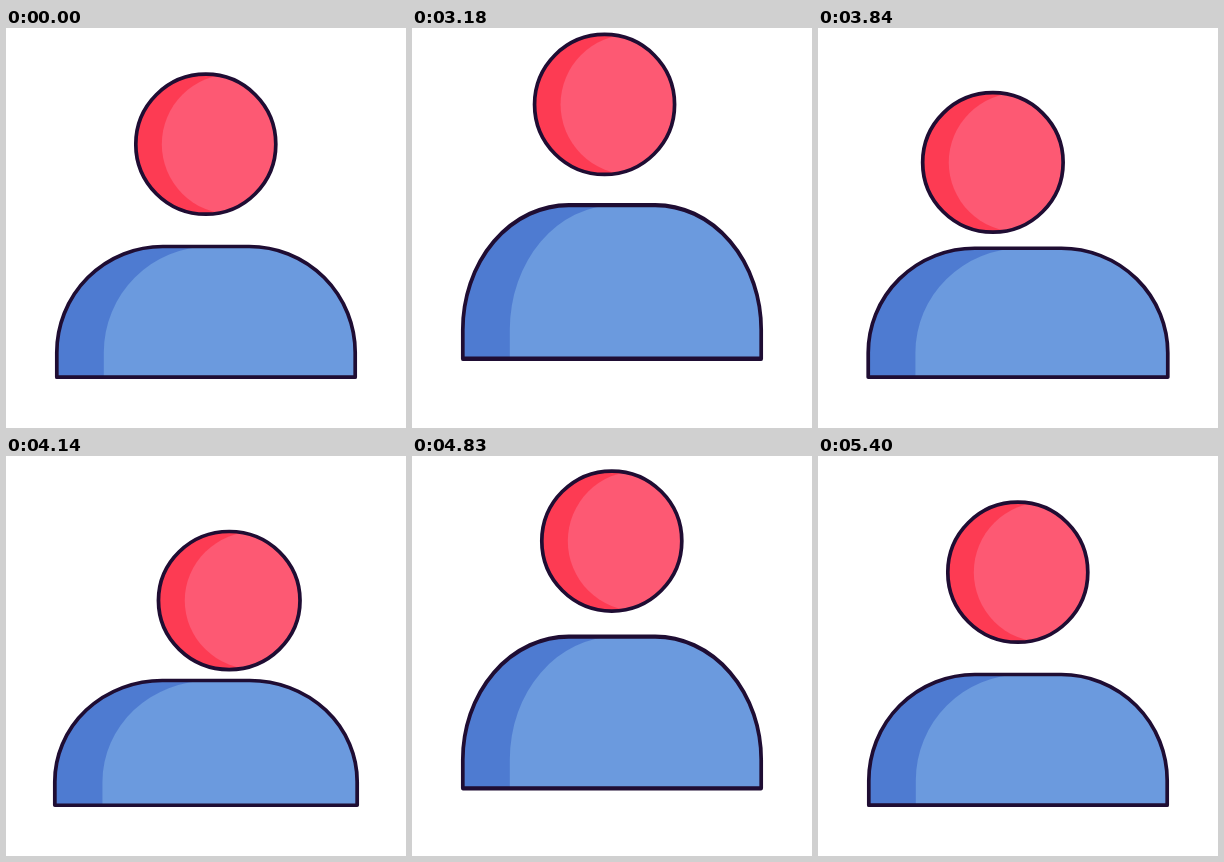
Recreate the animation shown at these times as an HTML page. Size 400 by 400 pixels, loop 5430 ms.

```html
<!DOCTYPE html>
<html lang="en">
<head>
<meta charset="utf-8">
<title>Avatar looking around</title>
<style>
  html, body { margin: 0; width: 100%; height: 100%; overflow: hidden; background: #fff; }
  svg { display: block; width: 100vw; height: 100vh; }
  .line { fill: none; stroke: #1f0d33; stroke-width: 3.7; stroke-linejoin: round; vector-effect: non-scaling-stroke; }
</style>
</head>
<body>
<svg viewBox="0 0 400 400">
  <defs>
    <path id="torso" d="M50.8 349.2V324.5A106 106 0 0 1 156.8 218.5H243.2A106 106 0 0 1 349.2 324.5V349.2Z"/>
    <circle id="face" r="70"/>
    <clipPath id="inTorso"><use href="#torso"/></clipPath>
    <clipPath id="inFace"><use href="#face"/></clipPath>
  </defs>
  <g id="body">
    <use href="#torso" fill="#4e7bd1"/>
    <g clip-path="url(#inTorso)"><use href="#torso" x="47" fill="#6b9ade"/></g>
    <use href="#torso" class="line"/>
  </g>
  <g id="head">
    <use href="#face" fill="#fd3b53"/>
    <g clip-path="url(#inFace)"><use href="#face" x="26" fill="#fd5973"/></g>
    <use href="#face" class="line"/>
  </g>
</svg>
<script>
const LOOP = 5430, STEP = 30;
const TOP = 218.5, BOTTOM = 349.2, HEAD_Y = 116.2, REACH = 25;

const body = document.getElementById('body');
const head = document.getElementById('head');

const span = (t, a, b) => Math.min(1, Math.max(0, (t - a) / (b - a)));
const ease = (u, p) => u < 0.5 ? (2 * u) ** p / 2 : 1 - (2 - 2 * u) ** p / 2;
const hump = (t, a, b) => Math.sin(Math.PI * span(t, a, b)) ** 2;
const settle = (t, a, b) => {
  const u = span(t, a, b);
  return Math.sin(2 * Math.PI * u) * (1 - u);
};

function draw(t) {
  // Look left while jumping, swing right through a crouch, then jump back to the middle.
  const x = REACH * (-ease(span(t, 3030, 3390), 3)
    + 2 * ease(span(t, 3780, 4260), 4)
    - ease(span(t, 4500, 4764), 3));
  const crouch = hump(t, 3780, 4260);
  const hop1 = hump(t, 3000, 3440);
  const hop2 = hump(t, 4645, 5145);
  const bounce = settle(t, 3440, 3690) + settle(t, 5145, 5400);

  const top = TOP - 45 * (hop1 + hop2) + 12 * crouch + 2.5 * bounce;
  const bottom = BOTTOM - 20 * (hop1 + hop2);
  const sx = 1 + 0.0265 * crouch;
  const sy = (bottom - top) / (BOTTOM - TOP);
  body.setAttribute('transform',
    `matrix(${sx} 0 0 ${sy} ${200 * (1 - sx)} ${top - TOP * sy})`);

  const y = HEAD_Y + 13.5 * (x / REACH) ** 2
    - 43 * hump(t, 3000, 3420) - 37 * hop2 + 33 * crouch + 4 * bounce;
  head.setAttribute('transform',
    `translate(${199.8 + x} ${y}) scale(${1 + 0.022 * crouch} ${1 - 0.028 * crouch})`);
}

const start = performance.now();
function tick() {
  const t = (performance.now() - start) % LOOP;
  draw(Math.floor(t / STEP) * STEP);
  requestAnimationFrame(tick);
}
tick();
</script>
</body>
</html>
```
